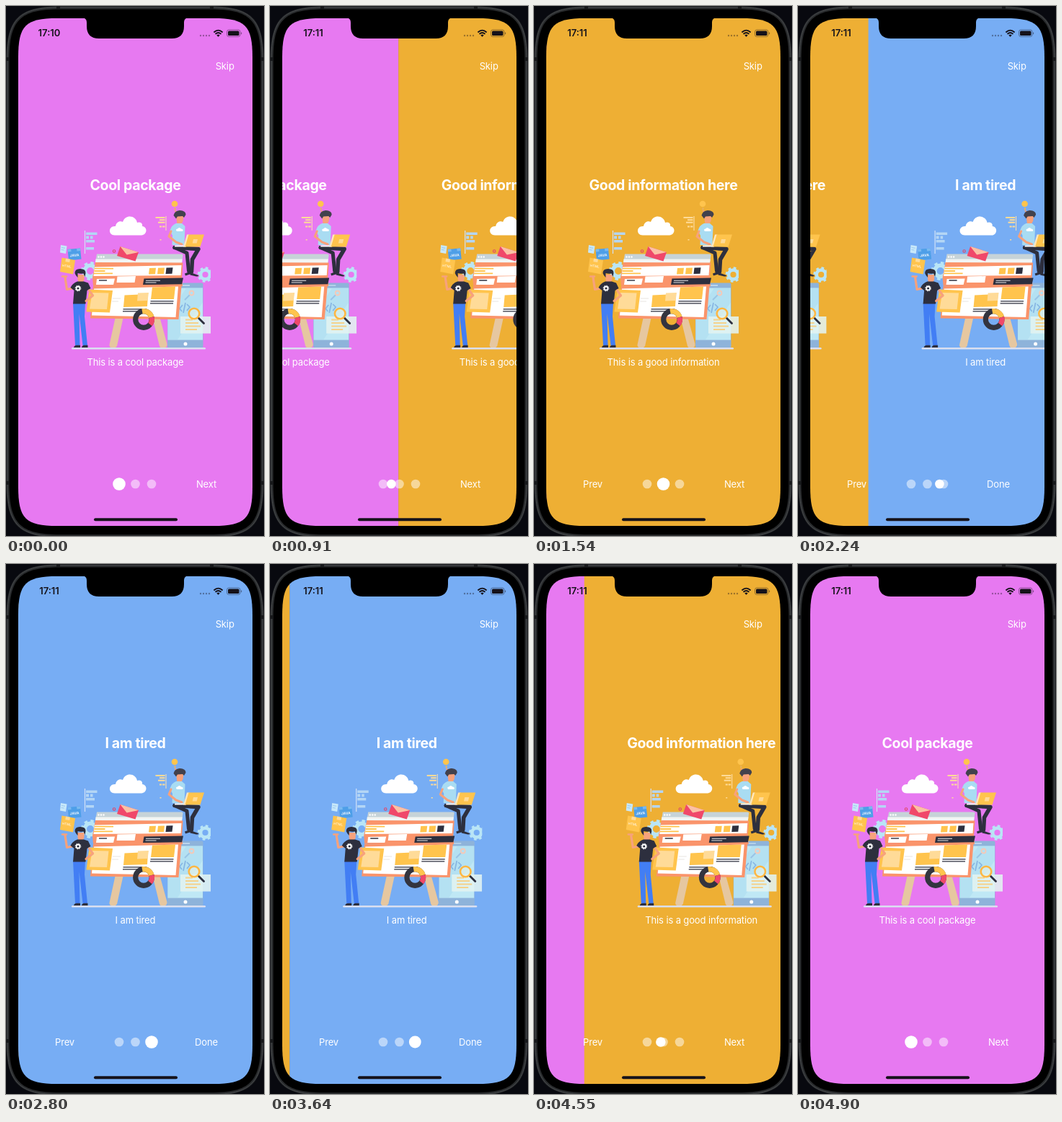
Recreate the animation shown at these times as an HTML page. Size 358 by 734 pixels, loop 6.37 s.

```html
<!DOCTYPE html>
<html lang="en">
<head>
<meta charset="utf-8">
<title>Onboarding pager</title>
<style>
  html, body { margin: 0; width: 100%; height: 100%; overflow: hidden; background: #08090f; }
  svg { display: block; width: 358px; height: 734px; }
  text { font-family: Inter, Roboto, sans-serif; text-anchor: middle; }
  .title { font-size: 19.5px; font-weight: 700; letter-spacing: -.35px; fill: #fff; }
  .body { font-size: 13px; letter-spacing: -.13px; fill: #fff; }
  .clock { font-size: 13px; font-weight: 600; fill: #15121a; }
  .ink { fill: #2d2f3e; }
  .skin { fill: #f7a27c; }
  .arm, .leg { fill: none; stroke: #f7a27c; stroke-linecap: round; stroke-linejoin: round; }
  .leg { stroke: #2d2f3e; }
  .sun { fill: #ffc44d; }
  .pale { fill: #ffdb98; }
  .wood { fill: #e6c7a0; }
  .coral { fill: #fa946b; }
  .white { fill: #fff; }
</style>
</head>
<body>
<svg viewBox="0 0 358 734">
  <defs>
    <clipPath id="screen"><path id="glass"/></clipPath>
    <clipPath id="artBox"><rect x="74" y="266" width="210" height="211"/></clipPath>
    <g id="gear" fill="none" stroke="#b9e5f6">
      <circle r="6.4" stroke-width="4.6"/>
      <circle r="9.3" stroke-width="3" stroke-dasharray="3.65 3.65"/>
    </g>

    <g id="art" clip-path="url(#artBox)">
      <path class="white" d="M151 317.500C141 317 142 304 152 305C153 299 158 297 162 299C166 288 180 290 182 300C187 298 190 302 189 305C197 306 196 317 188 317.500Z"/>

      <!-- code snippets -->
      <path d="M109.500 311V343" stroke="#d3e2f7" stroke-width="1.200"/>
      <path fill="#b4d6f5" d="M111 313.500h15.500v3.500h-15.500zM111 318.500h4v4h-4zM117 318.500h3.500v4h-3.500zM111 324h12v3.500h-12zM111 334h11v3.500h-11z"/>
      <path d="M222 291V311" stroke="#ffe1b0"/>
      <path class="pale" d="M207.500 292h13v2h-13zM213 295.300h7.500v2h-7.500zM211 298.700h9.500v2h-9.500zM213 304.500h3v2h-3zM217 304.500h3.500v2h-3.500zM213.500 323h2v1.500h-2z"/>

      <!-- boxes -->
      <path fill="#c8e8fa" d="M76 331L84.500 332.500L83 343L75 341.500Z"/>
      <path d="M77 334.500l5 .8M76.700 337.500l4 .6" stroke="#8fc0ea" stroke-width=".8"/>
      <path fill="#4e9fe8" d="M85.500 337L103 335.500L104.500 350.500L87 352.500Z"/>
      <path fill="#7ab9f0" d="M85.500 337L90 336.600L90.700 340L86 340.500ZM98 336L103 335.500L103.400 339L98.500 339.500Z"/>
      <text x="95" y="347" transform="rotate(-5 95 345)" font-size="5" font-weight="600" fill="#fff">JAVA</text>
      <path class="sun" d="M77.500 348.500L96 352L93 371.500L75 368Z"/>
      <path class="pale" d="M83 349.500L89 350.700L88.200 355L82.300 354Z"/>
      <text x="84.500" y="362" transform="rotate(10 85 360)" font-size="4.500" fill="#fff">HTML</text>

      <use href="#gear" transform="translate(117 367) scale(1.2)"/>
      <use href="#gear" x="276.500" y="372"/>

      <!-- tablet -->
      <rect x="224" y="383.500" width="49.500" height="90" rx="2" fill="#8eb3da"/>
      <path fill="#bfe8f5" d="M224.500 390.500h48.500v72h-48.500z"/>
      <path fill="#a9dcf0" d="M224.500 430L250 390.500h23v20L238 462h-13.500z" opacity=".5"/>
      <path d="M243 387h12" stroke="#d9edf8" stroke-width="1.200"/>
      <circle class="white" cx="249" cy="468" r="2.500"/>
      <path d="M245 414l-4 5 3 4M249 411l-3 14M251 413l4 4-4 5" fill="none" stroke="#87b6e3" stroke-width="1.700"/>
      <path d="M248 407L255 400" stroke="#9ac4e6" stroke-width="2"/>
      <circle cx="257.500" cy="397.500" r="3" fill="none" stroke="#f4c9b8" stroke-width="1.800"/>
      <path fill="#e3f4f2" fill-opacity=".88" d="M242 430h42v23.500h-42z"/>
      <path d="M249 434.500h10M249 439h18M249 443.500h21M249 448h16" stroke="#f4d28c" stroke-width="1.900"/>
      <path d="M267 432L274.500 439.500" stroke="#2d2f3e" stroke-width="2.800" stroke-linecap="round"/>
      <circle cx="261" cy="426" r="7.300" fill="#e9f4e8" fill-opacity=".6" stroke="#ffb743" stroke-width="2.600"/>

      <!-- easel and windows -->
      <path class="wood" d="M152 430H163L154 471Q152 474 148 473.500Q143 473 143.500 469ZM203 430H213L223.500 468Q224 473 219 473.500Q214 474 213 471Z"/>
      <path fill="#c6d3d8" d="M126 343.500H244Q245.500 343.500 245.500 345L244 356H124Z"/>
      <g class="white"><circle cx="128.500" cy="347.500" r="1.200"/><circle cx="132" cy="347.500" r="1.200"/><circle cx="135.500" cy="347.500" r="1.200"/></g>
      <path fill="#f2f5f4" d="M124.500 350.500H244.700L244 356H124Z"/>
      <path class="coral" d="M124 355L245.500 355.500L244 377L245 388L121 387.500L120 376Z"/>
      <path class="white" d="M123 361.500L243.500 359L242.500 373L121.500 374Z"/>
      <path d="M123 363.700h26M122.500 367h15M122 370.300h26" stroke="#ffc44d" stroke-width="1.800"/>
      <path class="sun" d="M199 363l9-.3-1 8.500-9 .3zM211 362.700l9-.3-1 8.500-9 .3z"/>
      <path class="ink" d="M222.500 362.500l9-.3-1 8.500-9 .3z"/>
      <path class="white" d="M126 378L151 377.500L149 386H125ZM154.500 374.500L180 374L178.500 383H153.500Z"/>
      <path d="M129 380h11" stroke="#2d2f3e" stroke-width="1.400"/>
      <path class="ink" d="M191.500 377.500L246 376.500L244 385.500L190 386Z"/>
      <path d="M194 380.300h20M193.500 383h15" stroke="#fff" stroke-width=".9"/>
      <path class="coral" d="M121 387.500L243.500 385.500Q244 386 243.500 388L239.500 434L117 432.500Z"/>
      <path class="white" d="M122 391.500L239 388.500L235.500 431L119 428.500Z"/>
      <path class="sun" d="M115.500 392.500L148 394L144 424.500L111.500 423.500Z"/>
      <path class="pale" d="M119.500 397L142.500 397.500L140 420L116 419.500Z"/>
      <path class="sun" d="M164.500 400.500L197 399L196 416L163 417Z"/>
      <path class="pale" d="M183 397.500L198 397L196.500 408L182 408.500Z"/>
      <path class="sun" d="M203 389.500L235 388.500L233 406L201 406Z"/>
      <path d="M162.500 419.800h32M162 422.800h20M200.500 408.800h32M200 411.800h32" stroke="#2d2f3e" stroke-width="1.300"/>
      <path d="M148 405h11M147 409h9" stroke="#e8e4e0" stroke-width="1"/>
      <g fill="none" stroke-width="7.200">
        <circle cx="191" cy="434" r="11.300" stroke="#33343f"/>
        <path d="M189 422.900A11.300 11.300 0 0 1 202 431" stroke="#ffc44d"/>
        <path d="M202 431A11.300 11.300 0 0 1 200 441" stroke="#f0486a"/>
      </g>
      <path fill="#f0486a" d="M158.500 333L184 341L179.500 353.500L154 346Z"/>
      <path fill="#fbc1a5" d="M158.500 333L184 341L167.500 344.500Z"/>
      <circle cx="150" cy="339.500" r="1.700" fill="none" stroke="#e0486a" stroke-width="1.100"/>

      <rect x="91" y="473" width="186" height="2.500" rx="1.200" fill="#dadff0"/>

      <!-- standing figure -->
      <path d="M92 391L84.500 392.500L82 376" class="arm" stroke-width="3.200"/>
      <path d="M78 374.500h6" class="arm" stroke-width="2.400"/>
      <path fill="#427ef4" d="M93 411H110L109 430L113 470H106.500L101.500 426L102.500 470H96Z"/>
      <path class="ink" d="M94 473Q95 469.500 99 469.800H103V473ZM105 473Q106 469.500 109 469.800H113.500V473Z"/>
      <path class="skin" d="M99 372H108.500V379L106 384H101L99.500 379Z"/>
      <path class="ink" d="M95.500 370Q95.500 363.800 103 364Q111 364.200 110.500 370L109.500 375L107.500 370.500Q103 371 99.500 370L99.500 376L97 373Z"/>
      <path class="ink" d="M99 381.500L108 381.500L114 383.500L117.500 391L112.500 394L110.500 412.500H93L94.500 394L89.500 390Q92 384 99 381.500Z"/>
      <circle cx="100" cy="391" r="2.500" fill="none" stroke="#fff" stroke-width="1.800"/>
      <circle cx="100" cy="391" r="3.900" fill="none" stroke="#fff" stroke-width="1" stroke-dasharray="1.530 1.530"/>
      <path d="M115.500 394L120.500 401L111 408.500" class="arm" stroke-width="3.200"/>

      <!-- seated figure -->
      <circle class="sun" cx="234" cy="274" r="4.300"/>
      <path d="M234.500 279.500v3" stroke="#e8b264" stroke-width="2"/>
      <path d="M234 283.500L239 286" stroke="#f7a27c" stroke-width="1.400"/>
      <path class="skin" d="M236 290H246.500L245.500 298L242.500 303H237.500Z"/>
      <path fill="#42414d" d="M232.500 290Q234 283.500 241 283Q249.500 283.500 249.500 289L247 293L245 291L238 291.500L236 294.500Z"/>
      <path fill="#a9dcf2" d="M236 301L244 301L248.500 305L247.500 331H230.500L231 318L227.500 311Q230 303 236 301Z"/>
      <path class="white" d="M237 312Q234.500 309 238 308.500Q240.500 305.500 243 308.500Q247 309 245 312Z"/>
      <path d="M229 312L226 319L236 327L244 330" class="arm" stroke-width="3"/>
      <path class="leg" d="M234 334.500L251 342L253.500 367" stroke-width="5"/>
      <path class="leg" d="M234 334.500L267 336.500L258.500 351L257.500 368" stroke-width="5.500"/>
      <path class="ink" d="M248 370.500L256 367.500L257 371L249 373.500ZM256 369L267 373Q267.500 375 264 374.500L255.500 372.500Z"/>
      <path d="M234 332.500H250" stroke="#fff" stroke-width="2"/>
      <path fill="#ffe7bd" d="M251 316.500H254.500L249.500 333.500H246Z"/>
      <path class="sun" d="M253.500 316.500H275L269.500 333.500H248.500Z"/>
      <path class="pale" d="M260 323h6l-1.300 5.500h-6z"/>
    </g>
  </defs>

  <!-- phone body -->
  <rect width="358" height="734" fill="#08090f"/>
  <path id="rim" fill="#292b2d"/>
  <path id="edge" fill="none" stroke="#484b4d"/>
  <path id="bezel"/>
  <path d="M70 2.500h5M283 2.500h5M2.500 71v5M2.500 658v5M355.500 71v5M355.500 658v5" stroke="#17181a" stroke-width="4"/>

  <g clip-path="url(#screen)">
    <g id="pages"></g>
    <path d="M106 16Q112 17 112 23V28Q112 45 129 45H230Q247 45 247 28V23Q247 17 253 16Z"/>

    <text class="clock" id="clock" x="60" y="42.300"></text>
    <g fill="#15121a">
      <g fill-opacity=".38"><circle cx="270" cy="41" r="1.200"/><circle cx="274" cy="41" r="1.200"/><circle cx="278" cy="41" r="1.200"/><circle cx="282" cy="41" r="1.200"/></g>
      <path d="M292.300 40.500Q294.500 38.700 296.700 40.500L294.500 42.800Z"/>
      <path d="M288.400 36.500Q294.500 30.800 300.600 36.500M290.500 38.800Q294.500 35.200 298.500 38.800" fill="none" stroke="#15121a" stroke-width="1.800"/>
      <rect x="306.500" y="33" width="18.500" height="9.500" rx="2.800" fill="none" stroke="#15121a" stroke-opacity=".4"/>
      <rect x="308" y="34.500" width="15.500" height="6.500" rx="1.500"/>
      <path d="M326 36.200q1.300 .4 1.300 1.600t-1.300 1.600z" fill-opacity=".45"/>
      <rect x="122" y="709.300" width="116" height="4" rx="2"/>
    </g>

    <text class="body" x="303.700" y="88">Skip</text>
    <text class="body" id="prev" x="81.500" y="666.500">Prev</text>
    <text class="body" id="next" x="278" y="666.500"></text>
    <g fill="#fff">
      <g fill-opacity=".5"><circle cx="157" cy="662" r="6.300"/><circle cx="179.500" cy="662" r="6.300"/><circle cx="202" cy="662" r="6.300"/></g>
      <circle id="dot" cy="662"/>
    </g>
  </g>
</svg>
<script>
  const LOOP = 6370, STEP = 70, WIDTH = 325;
  const $ = id => document.getElementById(id);
  const screens = [
    ['#e779f1', 'Cool package', 'This is a cool package'],
    ['#eeaf34', 'Good information here', 'This is a good information'],
    ['#77adf4', 'I am tired', 'I am tired']
  ];

  // Rectangle with continuous corners: reach e along each side, handles at k.
  function squircle(l, t, r, b, e, k) {
    return `M${l} ${t + e}C${l} ${t + k} ${l + k} ${t} ${l + e} ${t}
      H${r - e}C${r - k} ${t} ${r} ${t + k} ${r} ${t + e}
      V${b - e}C${r} ${b - k} ${r - k} ${b} ${r - e} ${b}
      H${l + e}C${l + k} ${b} ${l} ${b - k} ${l} ${b - e}Z`;
  }
  $('glass').setAttribute('d', squircle(17, 17, 342, 720, 54, 10));
  $('rim').setAttribute('d', squircle(.5, .5, 357.5, 736, 74, 17));
  $('edge').setAttribute('d', squircle(1.8, 1.8, 356.2, 734.7, 73, 16.5));
  $('bezel').setAttribute('d', squircle(4.5, 4.5, 353.5, 732, 70, 15));

  $('pages').innerHTML = screens.map(([color, title, body]) => `<g>
    <rect x="17" y="17" width="325.5" height="703" fill="${color}"/>
    <text class="title" x="179.5" y="255">${title}</text>
    <use href="#art"/>
    <text class="body" x="179.5" y="497.5">${body}</text></g>`).join('');
  const pages = [...$('pages').children];

  // A finger drag up to `reach`, then an exponential settle.
  function swipe(t, start, release, end, reach, power) {
    if (t <= start) return 0;
    if (t >= end) return 1;
    if (t < release) return reach * ((t - start) / (release - start)) ** power;
    return 1 - (1 - reach) * Math.exp((release - t) / 125);
  }

  function glide(t, start, end) {
    const u = Math.min(1, Math.max(0, (t - start) / (end - start)));
    return u * u * (3 - 2 * u);
  }

  const position = t =>
    swipe(t, 490, 910, 1540, .504, 2) + swipe(t, 2030, 2240, 2800, .752, 1.3)
    - glide(t, 3590, 4060) - glide(t, 4430, 4900);

  function draw(t) {
    const pos = position(t);
    const current = Math.floor(pos + .4);
    const away = Math.abs(pos - Math.round(pos));
    pages.forEach((page, i) =>
      page.setAttribute('transform', `translate(${((i - pos) * WIDTH).toFixed(2)} 0)`));
    $('dot').setAttribute('cx', 157 + 22.5 * pos);
    $('dot').setAttribute('r', 6.3 + 2.5 * Math.max(0, 1 - away / .2));
    $('prev').style.display = current > 0 ? '' : 'none';
    $('next').textContent = current === 2 ? 'Done' : 'Next';
    $('clock').textContent = t < 70 ? '17:10' : '17:11';
  }

  const origin = performance.now();
  function tick() {
    const t = (performance.now() - origin) % LOOP;
    draw(Math.floor(t / STEP) * STEP);
    requestAnimationFrame(tick);
  }
  tick();
</script>
</body>
</html>
```
